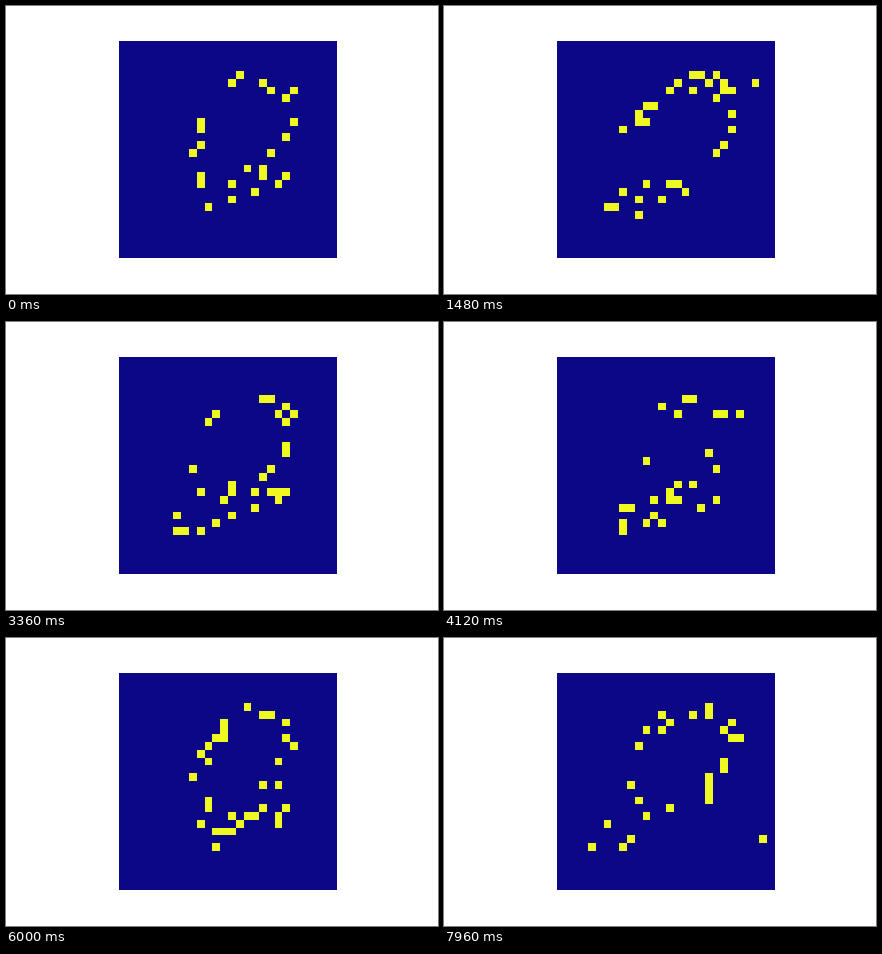
Animation of 432x288 px, one loop 8000 ms. Source, as a matplotlib script:

```python
import numpy as np
import matplotlib.pyplot as plt
from matplotlib.animation import FuncAnimation

SIZE = 28
FRAMES = 200
INTERVAL = 40
GAIN = 0.22        # firing chance at full brightness
BACKGROUND = 0.0012  # stray spikes anywhere in the grid
SEED = 28


def arc(center, radii, start, stop, skew):
    """Slanted elliptical arc in (column, row) units, angles in degrees."""
    t = np.radians(np.linspace(start, stop, 150))
    x = center[0] + radii[0] * np.cos(t)
    y = center[1] - radii[1] * np.sin(t + np.radians(skew))
    return np.column_stack([x, y])


def pen_path():
    """Handwritten 2: arch, stem, closed loop at the foot, wavy tail."""
    arch = arc((15.6, 10.6), (6.2, 5.8), 185, -80, 20)
    loop = arc((10.6, 19.3), (4.1, 2.2), 0, -360, 35)
    stem = np.linspace(arch[-1], loop[0], 30)
    s = np.linspace(0, 1, 50)
    tail = np.column_stack([13.5 + 6.5 * s, 17.6 + 1.2 * np.sin(np.pi * s)])
    return np.concatenate([arch, stem, loop, tail])


def digit():
    """Brightness of the digit, fading out with distance from the pen path."""
    px, py = pen_path().T
    rows, cols = np.mgrid[:SIZE, :SIZE]
    dist = np.hypot(cols[..., None] - px, rows[..., None] - py).min(axis=-1)
    return np.clip((1.85 - dist) / 1.6, 0, 1)


RATE = np.maximum(GAIN * digit(), BACKGROUND)


def spikes(frame):
    rng = np.random.default_rng([SEED, frame])
    return (rng.random(RATE.shape) < RATE).astype(float)


fig, ax = plt.subplots(figsize=(6, 4), dpi=72, facecolor="white")
fig.subplots_adjust(left=0.125, right=0.9, bottom=0.125, top=0.88)
ax.axis("off")
image = ax.imshow(spikes(0), cmap="plasma", vmin=0, vmax=1,
                  interpolation="nearest")


def update(frame):
    image.set_data(spikes(frame))
    return [image]


anim = FuncAnimation(fig, update, frames=FRAMES, interval=INTERVAL,
                     repeat=True, repeat_delay=0)
plt.show()
```
